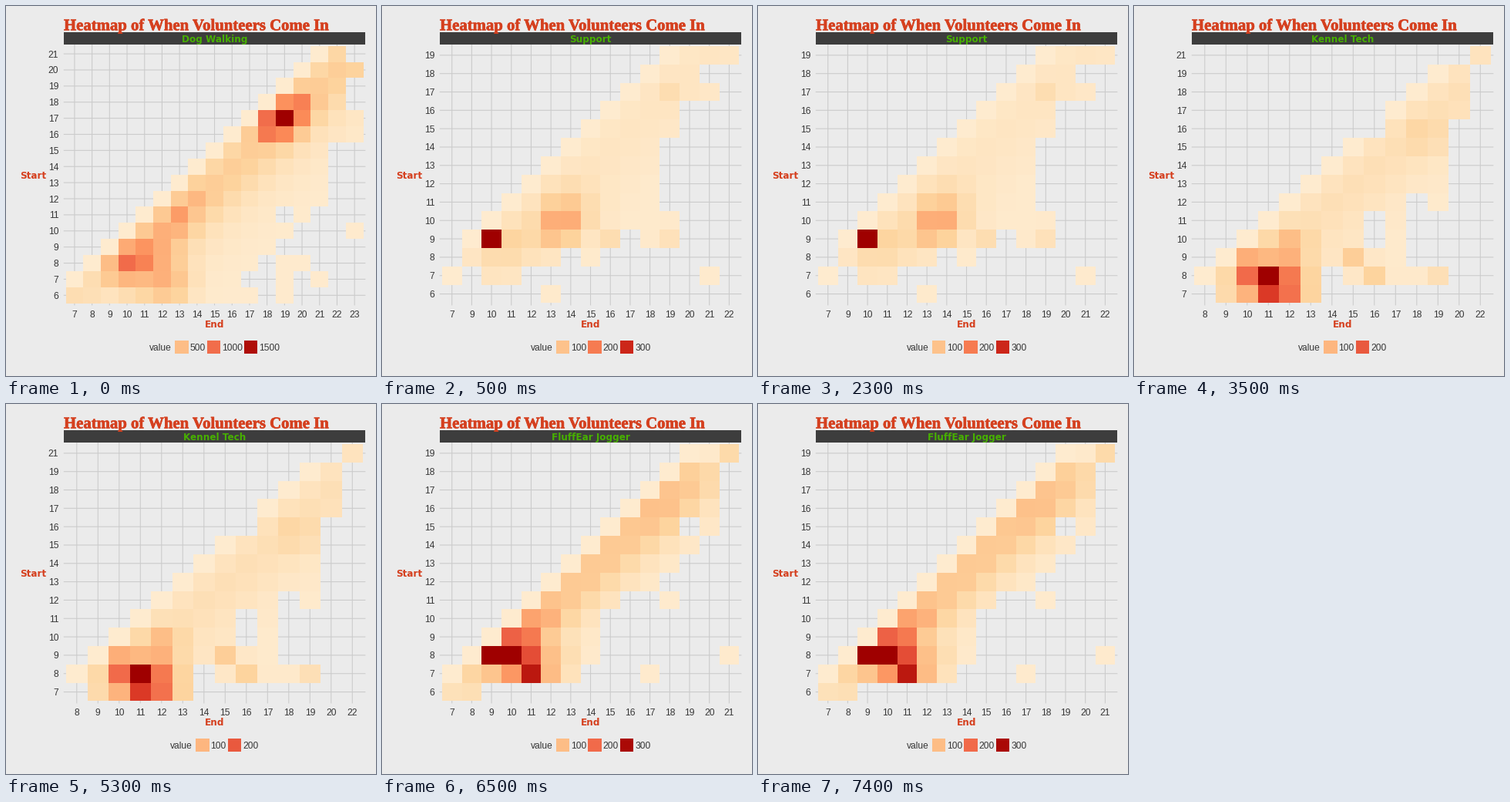
A matplotlib script that plays this animation: 480x480 px, repeating every 8000 ms.

```python
from math import exp

import matplotlib.pyplot as plt
from matplotlib.animation import FuncAnimation
from matplotlib.colors import LinearSegmentedColormap
from matplotlib.patches import Rectangle
from matplotlib.patheffects import withStroke

SIZE, DPI = 480, 80
LEFT, RIGHT, TOP, BOTTOM = 75.3, 465.8, 49.55, 387.85
BACK, GRID, DARK, RED, GREEN = "#ebebeb", "#cbcbcb", "#363636", "#d5401f", "#47b000"

heat = LinearSegmentedColormap.from_list("heat", [
    "#feeed5", "#fdd49e", "#fdbb84", "#fc8d59", "#ef6548", "#d7301f", "#9f0000"])


class Panel:
    """Heat over (end, start) hours: a ridge along the diagonal plus round bumps.

    lasts: latest end hour of each row, from the top row down
    gaps, islands: single cells missing inside, or standing outside, a row
    ridge: height of the ridge and the length of stay where it peaks
    bumps: (end, start, height, radius) in hours and percent
    """

    def __init__(self, name, ends, starts, lasts, gaps, islands, ridge, bumps,
                 top, step, key):
        self.name, self.ends, self.starts = name, list(ends), list(starts)
        self.lasts = dict(zip(self.starts, lasts))
        self.gaps, self.islands = gaps, islands
        self.ridge, self.bumps = ridge, bumps
        self.top, self.step, self.key = top, step, key

    def filled(self, end, start):
        inside = start <= end <= self.lasts[start] and (end, start) not in self.gaps
        return inside or (end, start) in self.islands

    def value(self, end, start):
        stay = end - start
        if stay == 0:
            return 2
        height, peak = self.ridge
        total = 2.5 + height * (stay / peak * exp(1 - stay / peak)) ** 2
        for x, y, h, r in self.bumps:
            total += h * exp(-((end - x) ** 2 + (start - y) ** 2) / (2 * r * r))
        return min(max(total, 2), 100)


PANELS = [
    Panel("Dog Walking", range(7, 24), range(21, 5, -1),
          [22, 23, 22, 22, 23, 23, 21, 21, 21, 21, 20, 19, 18, 17, 16, 17],
          gaps=[(19, 11)],
          islands=[(23, 10), (19, 8), (20, 8), (19, 7), (21, 7), (19, 6)],
          ridge=(18, 2),
          bumps=[(19, 17, 76, 0.7), (18, 16.4, 35, 0.6), (20, 18, 25, 0.6),
                 (10, 8, 36, 0.8), (11.3, 8.6, 21, 1), (12.3, 6.8, 26, 0.9),
                 (8.5, 5.7, -13, 1), (13, 11, 19, 0.6), (12.6, 10, 14, 0.7),
                 (14, 12, 13, 0.6)],
          top=1580, step=500, key=219.4),
    Panel("Support", [7, *range(9, 23)], range(19, 5, -1),
          [22, 20, 21, 19, 19, 18, 18, 18, 18, 19, 19, 15, 7, 6],
          gaps=[(17, 9), (14, 8)],
          islands=[(10, 7), (11, 7), (21, 7), (13, 6)],
          ridge=(3.5, 2),
          bumps=[(10, 9, 96, 0.35), (10.9, 8.7, 9, 0.9), (13.6, 10, 30, 0.7),
                 (13, 9.3, 15, 0.6), (14, 10.8, 9, 1), (16, 9, 8, 0.4),
                 (19, 17, 5, 0.5), (19, 9, 6, 0.5)],
          top=347, step=100, key=226),
    Panel("Kennel Tech", [*range(8, 21), 22], [21, *range(19, 6, -1)],
          [22, 20, 20, 20, 19, 19, 19, 19, 19, 17, 17, 17, 19, 13],
          gaps=[(16, 16), (18, 12), (16, 11), (16, 10), (14, 8), (8, 7)],
          islands=[],
          ridge=(7, 2),
          bumps=[(11.3, 7.4, 85, 0.9), (11, 8, 28, 0.4), (10, 8.45, 45, 0.5),
                 (12, 9.6, 26, 0.6), (15, 9, 17, 0.4), (16, 8, 14, 0.4),
                 (18.4, 15.6, 7, 0.7), (19, 8, 7, 0.5)],
          top=283, step=100, key=246.4),
    Panel("FluffEar Jogger", range(7, 22), range(19, 5, -1),
          [21, 20, 20, 20, 20, 19, 18, 17, 15, 14, 14, 14, 13, 8],
          gaps=[(19, 15)],
          islands=[(18, 11), (21, 8), (17, 7)],
          ridge=(23, 1.4),
          bumps=[(10, 8, 74, 0.6), (9, 8, 60, 0.35), (11, 7.2, 80, 0.55),
                 (10.5, 8.9, 36, 0.6), (11.5, 10, 18, 0.7), (12, 7.6, 20, 0.7),
                 (7.4, 6.2, -17, 0.8), (17.5, 16, 7, 1), (20, 19, -20, 0.8)],
          top=310, step=100, key=226),
]
STARTS = [0, 1, 7, 13]  # in steps of half a second

fig = plt.figure(figsize=(SIZE / DPI, SIZE / DPI), dpi=DPI, facecolor=BACK)
ax = fig.add_axes([0, 0, 1, 1])


def text(x, y, s, size=12, color=DARK, font="Liberation Sans", **kw):
    return ax.text(x, y, s, fontsize=size * 72 / DPI, color=color, family=font,
                   va="baseline", **kw)


def label(x, y, s, color=RED):
    text(x, y, s, color=color, font="DejaVu Sans", weight="bold", ha="center")


def box(x, y, w, h, color):
    ax.add_patch(Rectangle((x, y), w, h, facecolor=color, linewidth=0, zorder=2))


def grid_line(xs, ys):
    ax.plot(xs, ys, color=GRID, lw=0.97, zorder=1, snap=False)


def draw_tiles(panel):
    dx = (RIGHT - LEFT) / (len(panel.ends) + 0.2)
    dy = (BOTTOM - TOP) / (len(panel.starts) + 0.2)
    columns = [(LEFT + (i + 0.6) * dx, hour) for i, hour in enumerate(panel.ends)]
    rows = [(TOP + (i + 0.6) * dy, hour) for i, hour in enumerate(panel.starts)]
    for x, end in columns:
        grid_line([x, x], [TOP, BOTTOM])
        text(x, 404, str(end), ha="center")
    for y, start in rows:
        grid_line([LEFT, RIGHT], [y, y])
        text(68.3, y + 4.5, str(start), ha="right")
        for x, end in columns:
            if panel.filled(end, start):
                color = heat(panel.value(end, start) / 100)
                box(x - dx / 2, y - dy / 2, dx, dy, color)


def draw_legend(panel):
    x = panel.key
    text(x - 33, 447, "value")
    for value in range(panel.step, panel.top, panel.step):
        box(x, 434.2, 17.2, 17.2, heat(value / panel.top))
        text(x + 19.2, 447, str(value))
        x += 21.4 + 6.67 * len(str(value))


def draw(frame):
    ax.clear()
    ax.set(xlim=(0, SIZE), ylim=(SIZE, 0))
    ax.axis("off")
    panel = PANELS[sum(frame >= s for s in STARTS) - 1]
    title = text(75, 31.3, "Heatmap of When Volunteers Come In", 20.75, RED,
                 "Liberation Serif", weight="bold")
    title.set_path_effects([withStroke(linewidth=0.6, foreground=RED)])
    box(LEFT, 34, RIGHT - LEFT, TOP - 34, "#3d3d3d")
    label(270.5, 47, panel.name, GREEN)
    draw_tiles(panel)
    label(34.7, 224, "Start")
    label(270.4, 417, "End")
    draw_legend(panel)
    return []


anim = FuncAnimation(fig, draw, frames=16, interval=500, init_func=lambda: [],
                     repeat=True, repeat_delay=0)
plt.show()
```
